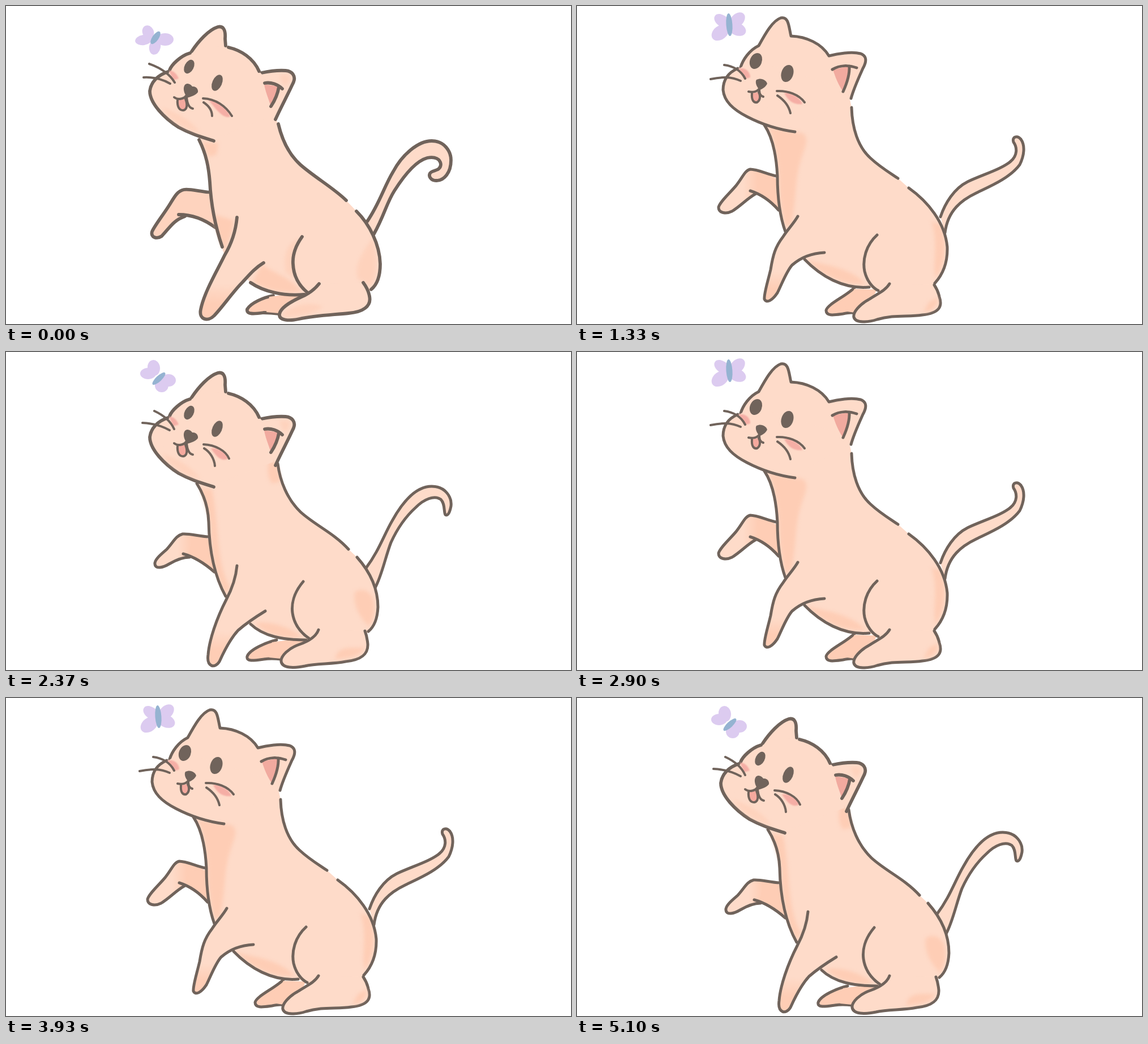
These frames come from a looping animation (998x561 px, 5.21 s). An HTML page:

```html
<!DOCTYPE html>
<html lang="en">
<head>
<meta charset="utf-8">
<title>Cat and butterfly</title>
<style>
html, body { margin: 0; width: 100%; height: 100%; overflow: hidden; background: #fff; }
svg { display: block; width: 100vw; height: 100vh; }
.pose { display: none; }
.pose.on { display: inline; }
path, ellipse { stroke-linecap: round; stroke-linejoin: round; }
.fur { fill: #fedbc9; }
.line, .part, .arm, .leg, .far, .mid { stroke: #70635b; stroke-width: 5; }
.bold :is(.line, .part, .arm, .leg, .far, .mid) { stroke-width: 5.8; }
.line, .hair { fill: none; }
.part { fill: #fedbc9; }
.arm { fill: url(#armFill); }
.leg { fill: url(#legFill); }
.far, .deep { fill: #fecdb5; }
.mid { fill: #fed3be; }
.midFill { fill: #fed3be; }
.hair { stroke: #70635b; stroke-width: 4; }
.shade { fill: #fecdb5; filter: blur(3px); }
.faint { opacity: .6; }
.blush { fill: #f5aea5; filter: blur(1px); }
.ear { fill: #f1aa9f; }
.tongue { fill: #f5a99e; stroke: #70635b; stroke-width: 4; }
.dark { fill: #70635b; }
.wing { fill: #dccbf0; }
.bug { fill: #95b3d1; }
</style>
</head>
<body>
<svg viewBox="0 0 998 561" preserveAspectRatio="none">
<defs>
  <linearGradient id="armFill"><stop offset=".42" stop-color="#fedbc9"/><stop offset=".68" stop-color="#fecdb5"/></linearGradient>
  <linearGradient id="legFill" x2="0" y2="1"><stop offset=".65" stop-color="#fedbc9"/><stop offset=".85" stop-color="#fecdb5"/></linearGradient>
</defs>

<!-- sitting -->
<g class="pose bold">
  <g class="wing">
    <ellipse cx="251" cy="46" rx="10" ry="12" transform="rotate(-25 251 46)"/>
    <ellipse cx="243" cy="60" rx="15" ry="9" transform="rotate(-8 243 60)"/>
    <ellipse cx="281" cy="59" rx="15" ry="11"/>
    <ellipse cx="263" cy="72" rx="10" ry="14" transform="rotate(12 263 72)"/>
  </g>
  <ellipse class="bug" cx="264" cy="56" rx="5.500" ry="13" transform="rotate(35 264 56)"/>
  <path class="part" d="M638 380C660 348 668 318 684 292C700 262 728 238 752 238C774 238 786 256 786 272C786 294 774 308 760 308C750 308 746 300 749 295C752 289 768 292 768 279C767 270 758 265 744 268C722 274 700 304 686 326C672 348 668 370 650 402"/>
  <path class="mid" d="M362 329C340 327 324 322 314 324C302 327 298 336 288 352C278 368 262 388 258 398C255 408 266 412 275 406C290 390 296 378 316 371"/>
  <path class="midFill" d="M362 331L316 334L308 369C330 368 350 376 370 391Z"/>
  <path class="line" d="M305 368C330 368 350 376 370 391"/>
  <path class="far" d="M472 511C455 514 432 524 426 535C424 545 440 543 455 541C465 541 475 542 482 543"/>
  <path class="deep" d="M465 513L530 504L530 520L482 542L460 540Z"/>
  <path class="fur" d="M341 236C354 262 358 285 360 310C362 350 370 390 386 440L432 488C455 504 490 512 530 509L605 542L645 500C655 492 661 478 661 455C660 420 642 385 619 362L601 343C580 322 545 302 520 280C500 262 488 238 481 208L476 198L447 115L289 112Z"/>
  <path class="shade" d="M346 240L375 242L372 262L358 266ZM368 368L402 378C400 400 392 420 386 432C376 415 370 390 368 368ZM452 456C475 472 500 478 522 503C490 508 460 502 436 486Z"/>
  <path class="shade faint" d="M520 410C500 415 488 435 494 470L510 480C504 450 510 425 520 410ZM647 410C632 430 612 460 622 482L643 494C656 480 658 445 647 410Z"/>
  <path class="line" d="M341 236C354 262 358 285 360 310C362 350 370 390 382 425M481 208C488 238 500 262 520 280C545 302 580 322 601 343M619 362C642 385 660 420 661 455C661 478 655 492 645 500M432 488C455 504 490 512 527 509M523 407C510 425 506 440 507 455C508 478 518 494 533 506"/>
  <path class="part" d="M553 490C545 500 535 508 520 514C500 523 484 534 483 544C482 555 500 556 518 552C545 546 575 545 605 542C630 540 646 530 642 512C640 500 634 492 631 488"/>
  <path class="shade faint" d="M490 542C510 526 540 520 560 531C540 544 510 549 490 547Z"/>
  <path class="leg" d="M408 373C406 395 398 420 386 440C374 465 350 505 344 535C340 553 356 558 368 546C385 528 400 505 418 487C430 474 440 462 455 453"/>
  <g id="lowHead">
    <path class="fur" d="M289 113C292 104 308 88 325 83L355 62L388 70C415 78 437 92 447 115L470 122L480 185L367 238Z"/>
    <path class="part" d="M286 116C268 122 256 134 254 150C254 172 280 198 305 214C325 225 345 231 367 238"/>
    <path class="part" d="M328 80C340 62 358 42 374 37C386 34 388 46 387 58L388 70"/>
    <path class="part" d="M451 118C465 115 480 113 494 114C506 115 512 124 508 134C500 152 486 178 476 200"/>
    <path class="fur" d="M289 115L325 86L355 70L384 72L410 80L444 112L456 125L472 194L366 234L270 160Z"/>
    <path class="line" d="M289 113C292 104 308 88 325 83M393 73C415 78 437 92 447 115"/>
    <path class="shade faint" d="M276 180C300 186 328 202 344 225C315 216 292 204 276 180ZM482 122L500 121L501 132L492 142Z"/>
    <path class="ear" d="M456 138L482 142C480 155 474 168 468 177C463 162 458 150 456 138Z"/>
    <path class="line" d="M457 136C468 134 480 138 488 146M482 143C480 155 474 168 468 177"/>
    <ellipse class="dark" cx="323.500" cy="107" rx="8" ry="13" transform="rotate(27 323.500 107)"/>
    <ellipse class="dark" cx="373" cy="135.500" rx="8.500" ry="15" transform="rotate(24 373 135.500)"/>
    <path class="tongue" d="M303 165C302 178 306 184 313 184C320 183 321 174 317 164"/>
    <path class="dark" d="M316 139C321 135 326 138 329 142C336 141 340 147 339 152C335 158 326 160 320 162C316 156 311 146 316 139Z"/>
    <path class="hair" d="M297 161C305 167 316 163 319 157C319 168 322 180 330 181"/>
    <path class="blush" d="M288 114C296 114 302 120 305 128L295 131Z"/>
  </g>
  <path class="blush" d="M358 166C378 168 390 180 396 195C385 200 372 184 358 166Z"/>
  <path class="hair" d="M253 102C270 108 288 118 298 135M243 126C262 125 278 130 290 137M348 163C370 164 388 176 399 194M349 170C358 176 364 184 364 194"/>
</g>

<!-- lifting a paw -->
<g class="pose">
  <g class="wing">
    <ellipse cx="261" cy="28" rx="11" ry="14" transform="rotate(-8 261 28)"/>
    <ellipse cx="251" cy="38" rx="14" ry="10"/>
    <ellipse cx="287" cy="50" rx="13" ry="11"/>
    <ellipse cx="275" cy="59" rx="12" ry="12"/>
  </g>
  <ellipse class="bug" cx="270" cy="47" rx="5" ry="15" transform="rotate(47 270 47)"/>
  <path class="part" d="M636 381C658 352 668 322 682 298C704 258 728 237 752 237C776 237 788 256 786 272C784 282 781 290 776 287C773 282 776 268 768 260C756 252 738 260 724 274C704 292 690 314 680 336C670 362 664 394 652 416"/>
  <path class="arm" d="M358 326C340 325 325 320 312 321C300 324 296 335 284 348C274 357 262 366 263 374C264 384 278 380 288 374C300 367 312 362 324 362"/>
  <path class="deep" d="M358 329L330 330L322 357C338 363 354 375 368 388Z"/>
  <path class="line" d="M313 356C335 362 352 374 368 388"/>
  <path class="far" d="M478 508C460 512 430 525 426 537C424 547 440 544 455 542C467 540 478 541 486 542"/>
  <path class="deep" d="M470 512L530 504L530 518L486 541L465 539Z"/>
  <path class="fur" d="M337 232C350 252 357 275 358 300C359 350 368 395 388 431L432 480C455 502 490 508 530 508L605 542L640 493C650 485 656 472 657 450C657 420 645 390 620 362L605 348C580 320 545 305 520 282C497 260 484 228 480 197L447 115L289 112Z"/>
  <path class="shade" d="M343 240L364 242C376 300 372 380 396 414L388 428C368 390 361 350 361 300ZM465 190L478 196L486 228L470 232C460 218 462 205 465 190ZM440 478C465 474 500 484 524 503C490 506 460 500 440 478ZM616 424C626 416 640 420 647 432C654 450 650 470 641 484C626 470 612 446 616 424Z"/>
  <path class="line" d="M337 232C350 252 357 275 358 300C359 350 368 395 388 431M480 197C484 228 497 260 520 282C545 305 580 320 605 348M620 362C645 390 657 420 657 450C656 472 650 485 640 493M432 480C455 502 490 508 530 508M525 405C508 425 504 445 506 460C509 482 522 496 535 505"/>
  <path class="part" d="M552 490C548 502 535 510 518 516C500 522 485 536 486 546C488 558 508 558 528 554C550 549 575 551 600 546C628 543 640 533 639 515C638 505 637 500 634 492"/>
  <path class="shade" d="M586 530C600 516 622 526 632 520C630 536 608 540 580 542Z"/>
  <path class="leg" d="M408 377C406 400 398 420 389 437C372 470 359 508 357 534C354 556 369 559 377 546C386 526 396 506 410 491C425 478 440 468 458 457"/>
  <use href="#lowHead"/>
  <path class="blush" d="M362 170C378 168 390 178 392 188C382 194 372 186 362 170Z"/>
  <path class="hair" d="M262 104C275 110 290 120 297 136M241 125C262 126 278 132 289 138M349 163C370 164 388 174 394 188M350 170C360 176 368 188 369 201"/>
</g>

<!-- rising -->
<g class="pose">
  <g class="wing">
    <ellipse cx="256" cy="26" rx="15" ry="10" transform="rotate(35 256 26)"/>
    <ellipse cx="283" cy="25" rx="16" ry="11" transform="rotate(-45 283 25)"/>
    <ellipse cx="253" cy="47" rx="17" ry="12" transform="rotate(-38 253 47)"/>
    <ellipse cx="283" cy="41" rx="16" ry="11" transform="rotate(22 283 41)"/>
  </g>
  <ellipse class="bug" cx="269" cy="33" rx="5.500" ry="20" transform="rotate(-4 269 33)"/>
  <path class="part" d="M642 372C650 348 666 322 690 310C715 298 750 288 766 274C778 264 778 250 771 240C768 230 778 228 784 235C792 246 790 264 782 280C764 304 730 318 705 330C680 342 655 360 650 400"/>
  <path class="arm" d="M352 300C335 296 318 288 306 288C296 290 292 304 280 318C268 332 252 346 250 355C250 366 264 367 274 362C290 352 300 340 316 331"/>
  <path class="deep" d="M354 303L325 305L318 329C332 336 344 346 356 360Z"/>
  <path class="line" d="M306 326C325 332 342 344 356 360"/>
  <path class="far" d="M490 497C475 512 442 526 440 537C440 548 455 545 470 543C480 541 486 540 490 542"/>
  <path class="deep" d="M490 499L530 500L520 520L491 541L470 538Z"/>
  <path class="fur" d="M331 210C346 232 352 262 354 300C354 340 358 370 368 398L402 447C430 476 470 500 516 496L605 540L632 489C645 475 655 455 654 425C650 382 620 345 586 321L567 304C552 294 535 284 518 268C496 248 486 215 485 179L480 155L440 110L340 90L292 109Z"/>
  <path class="shade" d="M338 214L398 224C412 232 402 250 396 270C384 305 388 345 378 386L368 390C360 360 357 330 357 300C354 260 348 235 338 214ZM406 448C440 458 480 460 510 490C470 494 432 474 406 448ZM626 380L643 386C654 420 650 455 634 480C626 460 640 420 626 380Z"/>
  <path class="line" d="M331 210C346 232 352 262 354 300C354 340 358 370 368 398M485 179C486 215 496 248 518 268C535 284 552 294 567 304M586 321C620 345 650 382 654 425C655 455 645 475 632 489M402 447C430 476 470 500 516 496M530 404C510 422 504 448 508 468C512 485 522 497 532 502"/>
  <path class="part" d="M552 490C545 502 530 508 515 518C500 526 487 540 489 549C492 560 515 558 530 553C560 544 585 549 610 545C640 542 646 530 640 513C638 503 635 498 631 492"/>
  <path class="shade" d="M622 522L637 514C638 530 628 538 612 540Z"/>
  <path class="leg" d="M390 371C382 385 372 394 364 407C350 425 346 440 342 465C336 490 330 508 331 517C335 526 346 518 354 506C362 490 370 468 380 457C395 444 415 436 437 435"/>
  <path class="part" d="M289 108C293 95 304 78 321 70C332 50 345 26 360 21C374 18 374 36 378 53C405 54 432 66 445 88C460 84 485 80 501 84C512 88 512 98 505 110C496 130 489 145 484 163"/>
  <path class="part" d="M284 110C266 118 258 132 258 148C260 168 275 182 300 195C325 208 355 218 385 222"/>
  <path class="fur" d="M286 111L310 95L470 145L481 163L384 218L300 150Z"/>
  <path class="ear" d="M452 112L481 106C482 122 476 138 470 151C462 140 456 125 452 112Z"/>
  <path class="line" d="M451 112C464 104 480 104 494 109M481 106C482 122 476 138 470 151"/>
  <ellipse class="dark" cx="316" cy="97" rx="10.500" ry="14.500" transform="rotate(22 316 97)"/>
  <ellipse class="dark" cx="371.500" cy="119" rx="10.500" ry="15.500" transform="rotate(18 371.500 119)"/>
  <path class="tongue" d="M309 154C308 166 312 171 318 170C323 167 325 160 321 152"/>
  <path class="dark" d="M317 130C325 126 334 130 336 137C334 142 328 146 323 148C317 143 314 134 317 130Z"/>
  <path class="blush" d="M285 110C298 108 306 116 306 126L296 129ZM366 153C380 152 396 163 398 173C385 175 372 168 366 153Z"/>
  <path class="hair" d="M303 151C312 153 318 151 322 146C322 154 323 158 329 160M260 104C276 106 290 114 297 128M236 129C255 125 272 124 289 132M353 150C372 149 392 156 402 170M354 158C366 166 374 175 377 189"/>
</g>

<!-- reaching up -->
<g class="pose">
  <g id="highBug">
    <g class="wing">
      <ellipse cx="224" cy="27" rx="18" ry="11" transform="rotate(14 224 27)"/>
      <ellipse cx="256" cy="15" rx="14" ry="15"/>
      <ellipse cx="267" cy="34" rx="19" ry="12"/>
      <ellipse cx="237" cy="47" rx="19" ry="14" transform="rotate(-42 237 47)"/>
    </g>
    <ellipse class="bug" cx="248" cy="33" rx="8" ry="23" transform="rotate(-25 248 33)"/>
  </g>
  <path id="highTail" class="part" d="M638 375C640 355 655 332 680 322C705 312 725 290 728 268C730 252 716 243 698 254C688 256 686 248 692 243C704 231 728 230 740 239C752 250 752 270 744 288C734 314 712 328 692 342C670 356 648 374 645 400"/>
  <g id="highArm">
    <path class="arm" d="M364 276C345 268 325 256 304 255C290 257 284 274 270 288C260 297 250 304 252 311C256 320 268 312 280 304C290 296 298 291 310 288"/>
    <path class="deep" d="M366 279L334 269L314 291C330 306 346 328 361 346Z"/>
    <path class="line" d="M303 284C320 298 342 322 361 346"/>
  </g>
  <g id="highBody">
    <path class="far" d="M468 471C460 486 464 498 473 507C460 520 428 530 427 540C428 548 455 546 480 545"/>
    <path class="deep" d="M469 473L506 471L530 502L510 522L481 544L460 540L473 507Z"/>
    <path class="fur" d="M359 206C370 235 368 270 366 295C362 330 363 360 369 388L396 430C425 455 460 468 506 473L605 538L635 484C645 472 650 455 649 430C646 390 622 350 587 322L556 298L525 273C502 250 486 218 484 184L482 160L450 100L350 80L310 104Z"/>
    <path class="shade" d="M365 208C400 208 440 196 478 190L482 216C460 230 425 232 406 246C398 300 408 350 388 378L371 384C366 350 366 325 369 295C372 260 372 235 365 208ZM630 400L644 402C649 435 642 465 632 476L612 482C632 455 634 430 630 400Z"/>
    <path class="line" d="M359 206C370 235 368 270 366 295C362 330 363 360 369 388M484 184C486 218 502 250 525 273C537 285 547 293 556 298M587 322C622 350 646 390 649 430C650 455 645 472 635 484M396 430C425 455 460 468 506 473M530 400C510 420 506 440 509 460C512 480 520 494 528 502"/>
    <path class="part" d="M547 492C540 502 520 512 505 523C490 532 479 542 482 550C486 560 505 556 522 552C550 543 585 545 612 541C640 537 642 522 637 507C636 500 634 496 632 492"/>
    <path class="shade" d="M560 533C590 518 615 520 633 510C635 528 620 535 605 537Z"/>
  </g>
  <path id="highLeg" class="part" d="M408 372C385 384 362 390 350 398C334 410 325 435 314 455C306 468 304 477 314 479C326 479 340 458 354 443C370 428 385 426 400 428L438 434"/>
  <g id="highHead">
    <path class="part" d="M307 104C308 90 316 76 329 68C336 45 348 18 364 16C376 18 378 32 386 40C412 41 438 52 454 66C475 57 495 52 512 54C520 56 521 66 516 80C510 105 492 135 485 170"/>
    <path class="part" d="M302 113C288 124 281 138 282 150C285 170 305 184 330 195C355 204 385 210 416 208"/>
    <path class="fur" d="M305 112L325 95L470 145L481 170L478 184L416 204L320 150Z"/>
    <path class="ear" d="M468 90C478 82 486 78 491 80C496 92 496 108 491 122C482 112 474 102 468 90Z"/>
    <path class="line" d="M467 90C478 80 492 75 508 77M491 78C498 92 498 108 491 123"/>
    <ellipse class="dark" cx="329" cy="94" rx="10" ry="15.500" transform="rotate(10 329 94)"/>
    <ellipse class="dark" cx="390" cy="108.500" rx="10.500" ry="16" transform="rotate(9 390 108.500)"/>
    <path class="tongue" d="M331 152C331 165 332 172 339 171C347 166 350 158 346 151"/>
    <path class="dark" d="M334 126C340 121 352 122 356 128C358 136 350 142 346 143C338 140 332 133 334 126Z"/>
    <ellipse class="blush" cx="312" cy="116" rx="10" ry="8"/>
    <ellipse class="blush" cx="397" cy="145" rx="18" ry="9"/>
    <path class="hair" d="M320 148C330 154 340 150 346 142C346 150 350 156 356 156M269 102C290 103 306 114 317 127M264 131C285 126 300 127 311 131M371 141C390 133 410 134 427 143M374 147C390 146 402 156 407 168"/>
  </g>
</g>

<!-- highest reach -->
<g class="pose">
  <use href="#highBug" transform="translate(5 4) rotate(12 248 33)"/>
  <use href="#highTail" transform="rotate(-3 640 385)"/>
  <use href="#highArm" transform="rotate(6 365 300)"/>
  <use href="#highBody"/>
  <use href="#highLeg" transform="rotate(9 408 400)"/>
  <use href="#highHead" transform="rotate(-2 430 170)"/>
</g>
</svg>
<script>
const LOOP = 5210;
const poses = [...document.querySelectorAll('.pose')];

// Length of each hold in thirtieths of a second; the rhythm plays twice per loop.
const holds = '54345434444354345433'.repeat(2);
let ticks = 0;
const starts = [...holds].map(hold => {
  const start = Math.round(ticks * 10 / 3) * 10;
  ticks += +hold;
  return start;
});

// The poses run up to the highest reach and back down.
function poseAt(time) {
  const step = starts.findLastIndex(start => start <= time) % 8;
  return step < 5 ? step : 8 - step;
}

const begin = performance.now();
function draw() {
  const current = poseAt((performance.now() - begin) % LOOP);
  poses.forEach((pose, i) => pose.classList.toggle('on', i === current));
  requestAnimationFrame(draw);
}
draw();
</script>
</body>
</html>
```
